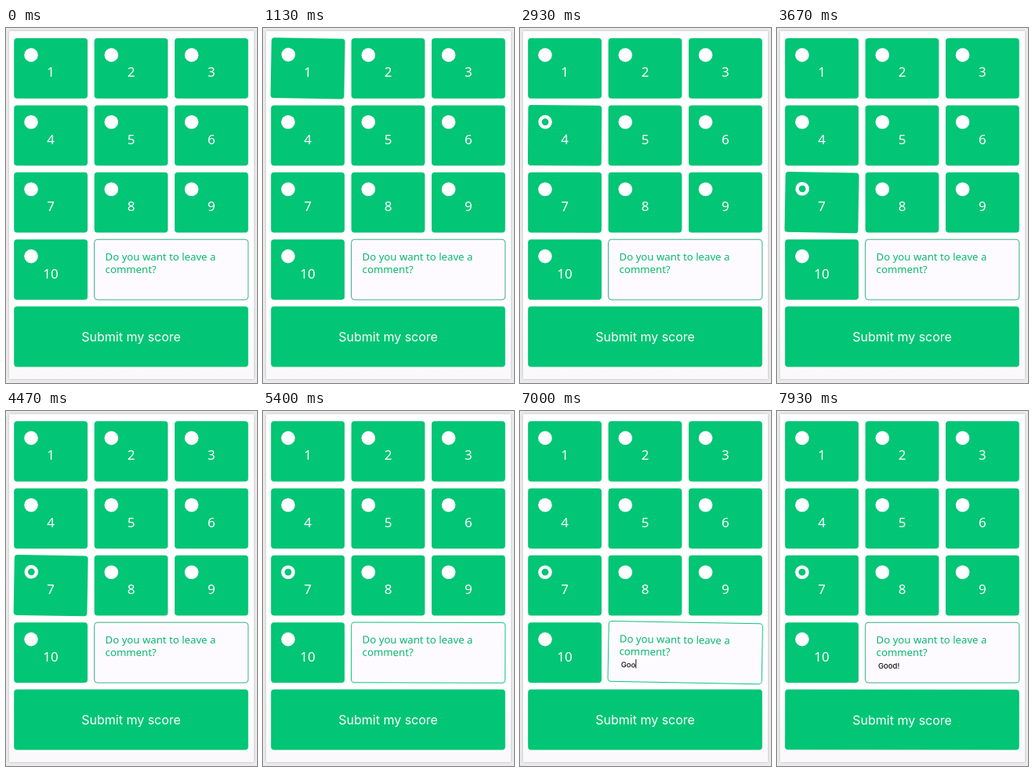
An HTML page that plays this animation: 320 px wide and 452 px high, repeating every 8000 ms.

```html
<!DOCTYPE html>
<html lang="en">
<head>
<meta charset="utf-8">
<title>Score form</title>
<style>
html, body { margin: 0; width: 100%; height: 100%; overflow: hidden; background: #ebebeb; }
svg { display: block; width: 100vw; height: 100vh; }
text { font: 500 13.2px "Noto Sans", "Open Sans", sans-serif; white-space: pre; }
.tile { fill: #02c575; }
.num, .send { fill: #fff; text-anchor: middle; }
.num { font-size: 17px; font-weight: 400; }
.send { font: 400 16px Inter, Roboto, sans-serif; }
.ask { fill: #0cb86f; }
.typed { font: 500 9.5px Inter, Roboto, sans-serif; fill: #111; }
</style>
</head>
<body>
<svg id="stage" viewBox="0 0 320 452">
  <defs>
    <filter id="shade" x="-5%" y="-5%" width="110%" height="110%">
      <feDropShadow dx="0" dy="0" stdDeviation="1.5" flood-opacity=".22"/>
    </filter>
    <linearGradient id="paper" x2="0" y2="1">
      <stop offset=".8" stop-color="#fff"/>
      <stop offset="1" stop-color="#faf8fb"/>
    </linearGradient>
  </defs>
  <rect x="4" y="4" width="312" height="443" fill="url(#paper)" filter="url(#shade)"/>
</svg>
<script>
const LOOP = 8000, FADE = 1000;
const stage = document.getElementById("stage");

function add(parent, tag, attrs, text = "") {
  const el = document.createElementNS("http://www.w3.org/2000/svg", tag);
  for (const key in attrs) el.setAttribute(key, attrs[key]);
  el.textContent = text;
  return parent.appendChild(el);
}

// CSS "ease": cubic-bezier(.25, .1, .25, 1)
function ease(x) {
  if (x <= 0) return 0;
  if (x >= 1) return 1;
  const curve = (a, b, s) => 3 * a * s * (1 - s) ** 2 + 3 * b * s * s * (1 - s) + s ** 3;
  let lo = 0, hi = 1;
  for (let i = 0; i < 24; i++) {
    const mid = (lo + hi) / 2;
    if (curve(.25, .25, mid) < x) lo = mid; else hi = mid;
  }
  return curve(.1, 1, lo);
}

const hovers = [];

// A rounded box that tilts by one degree between enter and leave
function box(col, row, cols, attrs, enter = Infinity, leave = Infinity) {
  const x = 10.2 + 102.4 * col, y = 13 + 85.4 * row;
  const width = 102.4 * cols - 8.6, height = 76.8;
  const g = add(stage, "g", {});
  add(g, "rect", { x, y, width, height, rx: 4, ...attrs });
  hovers.push({ g, cx: x + width / 2, cy: y + height / 2, enter, leave });
  return g;
}

const visits = { 1: [70, 1470], 4: [1540, 2580], 7: [2880, 4400] };
const checks = { 4: [2150, 3400], 7: [3400, LOOP] };
const dots = {};

for (let n = 1; n <= 10; n++) {
  const col = (n - 1) % 3, row = Math.floor((n - 1) / 3);
  const g = box(col, row, 1, { class: "tile" }, ...(visits[n] || []));
  const cx = 32 + 102.3 * col, cy = 34.4 + 85.4 * row;
  add(g, "circle", { cx, cy, r: 8.8, fill: "#fff" });
  dots[n] = add(g, "circle", { cx, cy, r: 4.4, class: "tile" });
  add(g, "text", { x: 57.1 + 102.4 * col, y: 62.4 + 85.4 * row, class: "num" }, n);
}

const note = box(1, 3, 2, { fill: "#fdfbff" }, 5270, 7000);
const frame = note.firstChild;
add(note, "text", { x: 126.6, y: 296, class: "ask" }, "Do you want to leave a");
add(note, "text", { x: 126.6, y: 312, class: "ask" }, "comment?");
const typed = add(note, "text", { x: 129, y: 327.6, class: "typed" });
const caret = add(note, "rect", { y: 317, width: 1, height: 11.5, fill: "#111" });

const send = box(0, 4, 3, { class: "tile" }, 7870);
add(send, "text", { x: 159.6, y: 399.4, class: "send" }, "Submit my score");

const FOCUS = 5560, BLUR = 7700;
const keys = [6550, 6720, 6940, 7130, 7330];

function draw(t) {
  for (const h of hovers) {
    const tilt = ease((t - h.enter) / FADE) - ease((t - h.leave) / FADE);
    h.g.setAttribute("transform", `rotate(${tilt} ${h.cx} ${h.cy})`);
    if (h.g === note) frame.setAttribute("stroke", tilt > .02 ? "#10c47b" : "#3aac86");
  }
  for (const n in dots) {
    const [on, off] = checks[n] || [LOOP, LOOP];
    dots[n].setAttribute("visibility", t >= on && t < off ? "visible" : "hidden");
  }
  const count = keys.filter(k => t >= k).length;
  typed.textContent = "Good!".slice(0, count);
  const last = count ? keys[count - 1] : FOCUS;
  const shown = t >= FOCUS && t < BLUR && (t - last) % 1000 < 500;
  caret.setAttribute("visibility", shown ? "visible" : "hidden");
  caret.setAttribute("x", 129 + (count ? typed.getComputedTextLength() : 0));
}

function tick() {
  draw(performance.now() % LOOP);
  requestAnimationFrame(tick);
}
tick();
</script>
</body>
</html>
```
